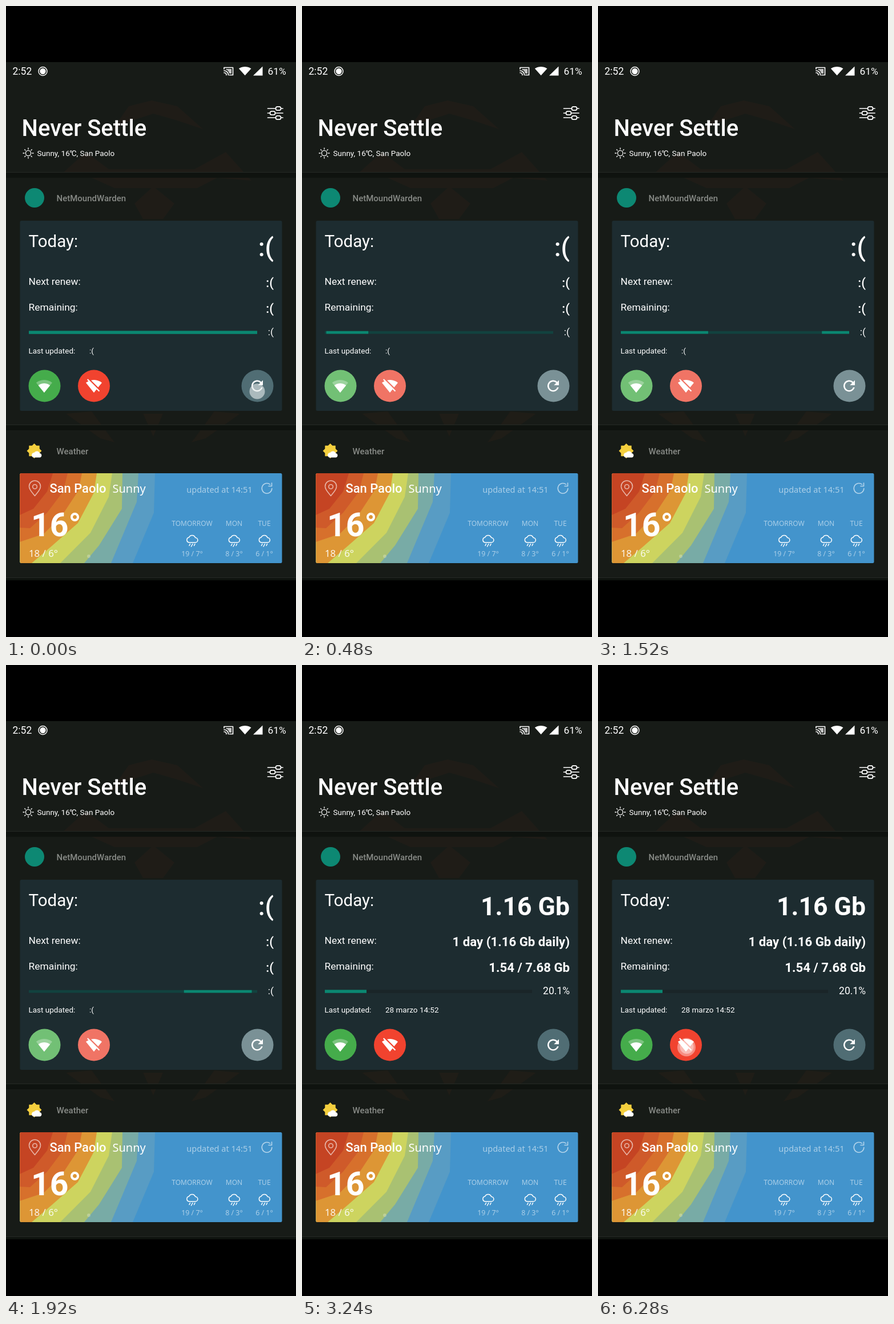
Animation, 508 px wide and 1102 px high, one loop 8000 ms. Source, as an HTML page:

```html
<!DOCTYPE html>
<html lang="en">
<head>
<meta charset="utf-8">
<title>Data usage widget</title>
<style>
html, body { margin: 0; width: 100%; height: 100%; overflow: hidden; background: #000; }
svg { display: block; width: 508px; height: 1102px; }
text { fill: #fff; font-family: Roboto, sans-serif; }
.noto { font-family: "Noto Sans", sans-serif; }
.mid { font-weight: 500; }
.bold { font-weight: 700; }
.end { text-anchor: end; }
.center { text-anchor: middle; }
.label { fill: #878a86; font-size: 15px; font-weight: 500; }
.row { font-size: 17.4px; }
.small { font-size: 13.5px; }
.line { fill: none; stroke: #fff; stroke-linecap: round; stroke-linejoin: round; }
.slide { transform-box: fill-box; transform-origin: center; }
</style>
</head>
<body>
<svg viewBox="0 0 508 1102">
  <defs>
    <clipPath id="track"><rect x="40" y="567.8" width="400" height="4.8"/></clipPath>
    <clipPath id="card"><rect x="24.5" y="816" width="459" height="157" rx="2.5"/></clipPath>
    <path id="fan" d="M12 21.5 23.64 7C23.2 6.66 18.7 3 12 3S.81 6.66.36 7z"/>
    <g id="rain" class="line" stroke-width="1.5">
      <path d="M-5 6a4.6 4.6 0 0 1-.4-9.1A6 6 0 0 1 5.6-2.600 4.300 4.300 0 0 1 5.500 6z"/>
      <path d="M-3.500 8.500-5 11.500M1 8.500-1.500 13M5 8.500 3.500 11.500"/>
    </g>
  </defs>

  <rect width="508" height="1102"/>
  <rect y="98" width="508" height="905" fill="#171b17"/>
  <g fill="#54281a" opacity=".13">
    <path d="M215 175 255 165 300 175 345 215 300 200 258 188 205 205 180 225z"/>
    <path d="M90 300 140 255 180 285 330 285 385 255 430 305 370 300 335 318 190 318 150 300z"/>
    <path d="M225 345 258 315 295 345 275 372 240 372z"/>
    <path d="M105 712 150 708 190 762 165 755zM240 712 275 712 258 752zM410 712 365 708 325 762 350 755z"/>
  </g>
  <g fill="#0f130f">
    <rect y="291" width="508" height="9"/><rect y="732" width="508" height="9"/><rect y="998" width="508" height="5"/>
  </g>
  <path d="M0 290.500H508M0 731.500H508M0 998.500H508" stroke="#252a25"/>

  <text x="11.500" y="120" font-size="17.500">2:52</text>
  <circle cx="64.500" cy="114" r="7.500" class="line" stroke-width="1.400"/>
  <circle cx="64.500" cy="114" r="5.200" fill="#fff"/>
  <path class="line" stroke-width="1.700" d="M382 110V107.500H397.500V120.500H391.500M382 113a7.500 7.500 0 0 1 7.500 7.500M382 116.500a4 4 0 0 1 4 4"/>
  <path d="M385 110H395V118H391A9 9 0 0 0 385 111z" fill="#fff" opacity=".75"/>
  <use href="#fan" fill="#fff" transform="translate(407.500 103.500) scale(.93 .83)"/>
  <path d="M449.500 105.500V121.500H433z" fill="#fff"/>
  <text x="458.500" y="120" font-size="17.400">61%</text>

  <g class="line" stroke-width="1.700">
    <path d="M458.500 179H472.500M481.500 179H485M458.500 187H462.500M471.500 187H485M458.500 195H472.500M481.500 195H485"/>
    <rect x="472.500" y="175.800" width="9" height="6.400" rx="3"/>
    <rect x="462.500" y="183.800" width="9" height="6.400" rx="3"/>
    <rect x="472.500" y="191.800" width="9" height="6.400" rx="3"/>
  </g>
  <text x="27.500" y="226.500" font-size="40" class="mid">Never Settle</text>
  <g id="sun" class="line" stroke-width="1.300"><circle cx="39" cy="257" r="4.600"/></g>
  <text x="54.500" y="262" class="small">Sunny, 16℃, San Paolo</text>

  <circle cx="50" cy="335" r="17" fill="#0d8873"/>
  <text x="88.500" y="341" class="label">NetMoundWarden</text>

  <rect x="24.500" y="375" width="459" height="332" rx="2.500" fill="#1d2c30"/>
  <text x="39.500" y="421" font-size="29.500">Today:</text>
  <text x="39.500" y="486.500" class="row">Next renew:</text>
  <text x="39.500" y="531.500" class="row">Remaining:</text>
  <text x="39.500" y="607" class="small">Last updated:</text>

  <g id="empty">
    <text x="469" y="437" font-size="44.500" class="mid end">:(</text>
    <text x="469" y="491" font-size="22.200" class="mid end">:(</text>
    <text x="469" y="536" font-size="22.200" class="mid end">:(</text>
    <text x="469" y="575" font-size="17.400" class="end">:(</text>
    <text x="146" y="607" class="small">:(</text>
  </g>
  <g id="data">
    <text x="469" y="437" font-size="44.500" class="bold end">1.16 Gb</text>
    <text x="469" y="491" font-size="22.200" class="bold end">1 day (1.16 Gb daily)</text>
    <text x="469" y="536" font-size="22.200" class="bold end">1.54 / 7.68 Gb</text>
    <text x="469" y="575" font-size="17.500" class="end">20.1%</text>
    <text x="146" y="607" class="small">28 marzo 14:52</text>
    <rect x="40" y="567.300" width="363" height="5.500" fill="#1a2528"/>
    <rect x="40" y="567.300" width="73" height="5.500" fill="#0b8771"/>
  </g>
  <rect id="full" x="40" y="567.300" width="400" height="5.500" fill="#0b8771"/>
  <g id="spin" clip-path="url(#track)">
    <rect x="40" y="567" width="400" height="7" fill="#12423f"/>
    <rect id="first" class="slide" x="40" y="567" width="400" height="7" fill="#0b8771"/>
    <rect id="second" class="slide" x="40" y="567" width="400" height="7" fill="#0b8771"/>
  </g>

  <circle id="on" cx="67.500" cy="663.500" r="28"/>
  <g fill="#fff" transform="translate(52.500 649.500) scale(1.200)">
    <use href="#fan" opacity=".3"/>
    <path d="M12 21.500 20.470 10.950C20 10.600 16.800 8 12 8s-8 2.600-8.470 2.950z"/>
  </g>
  <circle id="off" cx="154" cy="663.500" r="28"/>
  <path fill="#fff" transform="translate(139.600 649.500) scale(1.200)" d="M23.640 7c-.45-.34-4.930-4-11.640-4-1.500 0-2.890.19-4.150.48L18.180 13.800zm-6.600 8.220L3.270 1.440 2 2.720l2.050 2.060C1.910 5.760.59 6.820.36 7L12 21.500l3.910-4.870 3.320 3.320 1.270-1.270z"/>
  <circle id="renew" cx="440.500" cy="663.500" r="28"/>
  <path fill="#fff" transform="translate(425 648.500) scale(1.250)" d="M17.650 6.350A8 8 0 1 0 19.730 14h-2.080A6 6 0 1 1 16.220 7.780L13 11h7V4z"/>
  <circle id="tapA" cx="440" cy="673" r="13.500" fill="#e3eaea"/>
  <g id="tapB" fill="#fff">
    <circle cx="155" cy="667.500" r="16" opacity=".4"/>
    <circle cx="155.500" cy="667" r="12" opacity=".4"/>
  </g>

  <path id="star" fill="#f4cf3e"/>
  <path d="M49 788.500a4.200 4.200 0 0 1 .3-8.400 5.500 5.500 0 0 1 9.800.8 3.900 3.900 0 0 1 .4 7.600z" fill="#fff"/>
  <text x="88.500" y="783" class="label">Weather</text>

  <g clip-path="url(#card)">
    <rect x="24" y="816" width="460" height="157" fill="#4394cc"/>
    <g id="bands"></g>
    <circle cx="145" cy="961" r="3" fill="#fff" opacity=".25"/>
  </g>
  <g class="line" stroke-width="1.600" opacity=".6">
    <path d="M50.500 855.500C46 849.500 40.500 845 40.500 839a10 10 0 0 1 20 0C60.500 845 55 849.500 50.500 855.500z"/>
    <circle cx="50.500" cy="839.500" r="3.800"/>
    <path d="M465.800 842.500A8.800 8.800 0 1 1 462.500 835.500M465.500 833V838.500H460"/>
  </g>
  <text x="76.500" y="850" font-size="21.900" class="mid">San Paolo</text>
  <text x="186.500" y="850" font-size="20" class="noto">Sunny</text>
  <text x="44" y="926" font-size="57" class="bold">16°</text>
  <text x="40" y="961.500" font-size="16.800" class="noto" opacity=".9">18 / 6°</text>
  <text x="431.500" y="849.500" font-size="14.500" class="noto end" opacity=".55">updated at 14:51</text>
  <g id="days" class="noto"></g>
</svg>

<script>
const LOOP = 8000, START = 240, STALL = 2760, DONE = 3080, TAP = 6240;
const $ = id => document.getElementById(id);
const NS = "http://www.w3.org/2000/svg";
function add(parent, tag, attrs, text = "") {
  const el = document.createElementNS(NS, tag);
  for (const k in attrs) el.setAttribute(k, attrs[k]);
  el.textContent = text;
  return parent.appendChild(el);
}
const polar = (cx, cy, r, a) => `${cx + r * Math.cos(a)} ${cy + r * Math.sin(a)}`;

for (let i = 0; i < 8; i++) {
  const a = i * Math.PI / 4;
  add($("sun"), "path", { d: `M${polar(39, 257, 7, a)}L${polar(39, 257, 9, a)}` });
}
const tips = Array.from({ length: 16 }, (_, i) => polar(49.5, 777, i % 2 ? 10 : 13, i * Math.PI / 8));
$("star").setAttribute("d", `M${tips.join("L")}z`);

// Heat contours, widest first; each closes at the card's left edge.
const bands = [
  ["#589cc4", "261 816 259 885 222 973"],
  ["#78aba6", "232 816 229 866 184 973"],
  ["#a9c172", "204 816 203 878 163 942 137 973"],
  ["#cdd45f", "186 816 180 857 148 920 95 973"],
  ["#dd9635", "159 816 154 850 126 903 78 945 45 973"],
  ["#d7702c", "133 816 127 846 98 890 66 922 24 936"],
  ["#cf5a2a", "108 816 100 848 72 885 42 912 24 911"],
  ["#c54423", "82 816 72 848 48 878 24 889"]
];
for (const [fill, pts] of bands)
  add($("bands"), "polygon", { fill, points: `${pts} 24 973 24 816`.replace(/(24 9(?:36|11)|24 889) 24 973/, "$1") });

for (const [x, day, range] of [[326, "TOMORROW", "19 / 7°"], [399.5, "MON", "8 / 3°"], [452.5, "TUE", "6 / 1°"]]) {
  const style = { x, class: "noto center", opacity: .55 };
  add($("days"), "text", { ...style, y: 908, "font-size": 12 }, day);
  add($("days"), "use", { href: "#rain", transform: `translate(${x} 931)` });
  add($("days"), "text", { ...style, y: 961, "font-size": 12.4 }, range);
}

// Steps: [offset, value, easing]; shifts are in bar widths.
function track(el, prop, steps, write) {
  const frames = steps.map(([offset, v, ease]) =>
    ({ offset, [prop]: write(v), easing: ease ? `cubic-bezier(${ease})` : "linear" }));
  const anim = el.animate(frames, { duration: 2000, iterations: Infinity });
  anim.pause();
  return anim;
}
const shift = v => `${v * 400}px`;
const stretch = v => `${v} 1`;
const slides = [
  track($("first"), "translate", [
    [0, -1.4517], [.2, -1.4517, ".5,0,.702,.496"], [.5915, -.615, ".302,.381,.55,.956"], [1, .5544]
  ], shift),
  track($("first"), "scale", [
    [0, .08], [.3665, .08, ".335,.125,.786,1"], [.6833, .6615, ".226,0,.234,.629"], [1, .08]
  ], stretch),
  track($("second"), "translate", [
    [0, -.5489, ".15,0,.515,.41"], [.25, -.1724, ".31,.284,.8,.734"],
    [.4833, .295, ".4,.627,.6,.902"], [1, 1.0539]
  ], shift),
  track($("second"), "scale", [
    [0, .08, ".205,.057,.577,.454"], [.3333, .4825, ".2,.2,.65,1"],
    [.54, .72, ".4,0,.7,.8"], [.64, .52, ".25,.3,.4,1"], [1, .08]
  ], stretch)
];

const clamp = v => Math.max(0, Math.min(1, v));
const show = (id, on) => $(id).setAttribute("visibility", on ? "visible" : "hidden");
function mix(a, b, k) {
  return `rgb(${a.map((v, i) => Math.round(v + (b[i] - v) * k))})`;
}
const GREEN = [69, 172, 75], RED = [241, 67, 47], SLATE = [80, 109, 116], PRESSED = [45, 70, 76];
const PALE = { on: [114, 192, 117], off: [240, 116, 101], renew: [122, 145, 150] };

function render(t) {
  const busy = t >= START && t < DONE, done = t >= DONE;
  show("full", t < START);
  show("spin", busy);
  show("empty", !done);
  show("data", done);

  const run = Math.max(0, Math.min(t, STALL) - START);
  for (const anim of slides) anim.currentTime = run;

  const dim = busy ? clamp((t - START + 40) / 120) : 0;
  $("on").setAttribute("fill", mix(GREEN, PALE.on, dim));
  $("off").setAttribute("fill", mix(RED, PALE.off, dim));
  $("renew").setAttribute("fill", busy ? mix(PRESSED, PALE.renew, dim)
    : mix(SLATE, PRESSED, done ? 0 : clamp(t / 180)));

  $("tapA").setAttribute("opacity", t < START ? .62 - .52 * clamp(t / 200) : 0);
  $("tapB").setAttribute("opacity", t < TAP ? 0 : t < TAP + 40 ? .5 : 1);
}

const began = performance.now();
function tick() {
  const t = (performance.now() - began) % LOOP;
  render(Math.floor(t / 40) * 40);
  requestAnimationFrame(tick);
}
tick();
</script>
</body>
</html>
```
